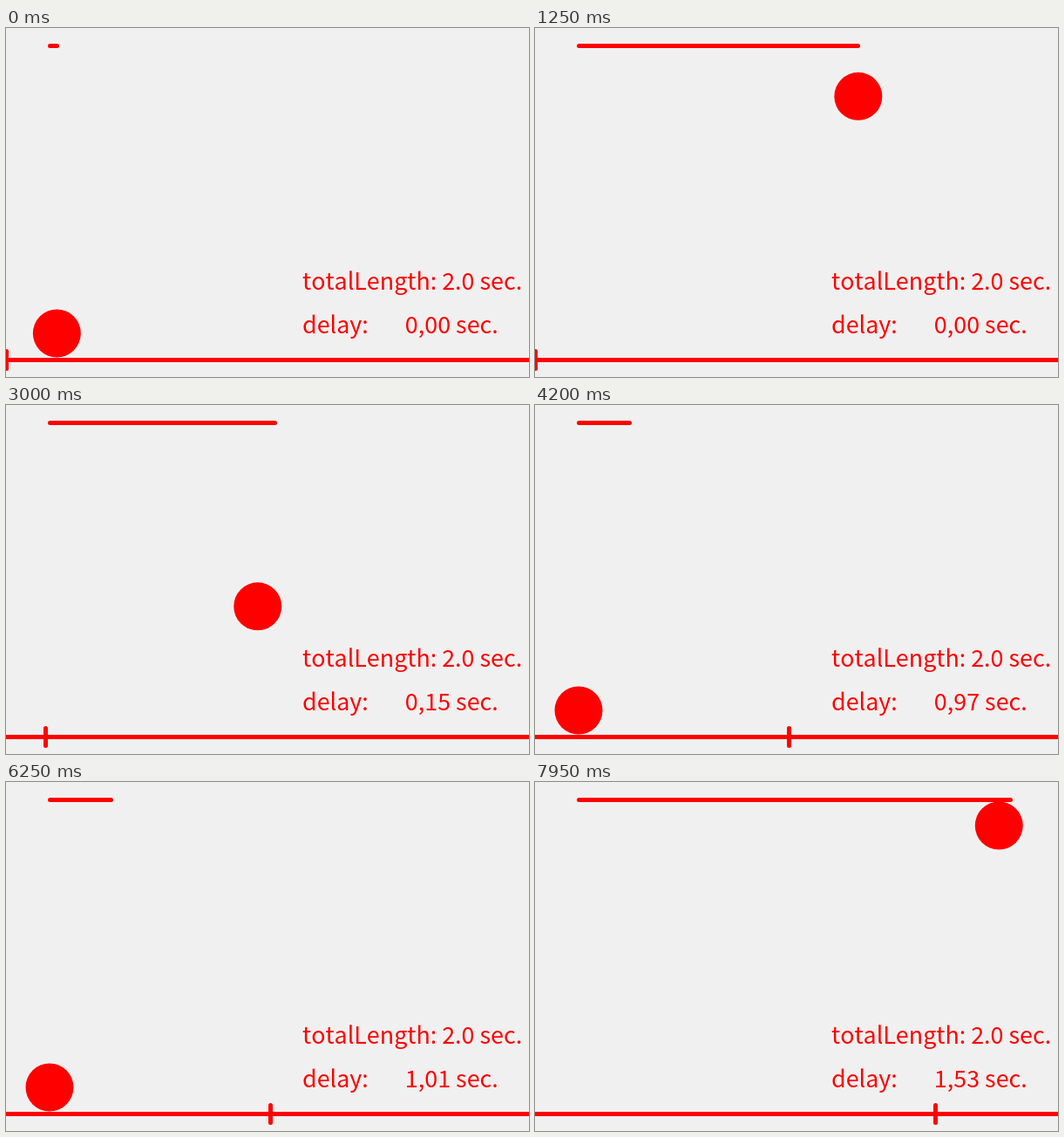
Recreate the animation shown at these times as an HTML page. Size 600 by 400 pixels, loop 8 s.

```html
<!DOCTYPE html>
<html lang="en">
<head>
<meta charset="utf-8">
<title>Delayed easing</title>
<style>
  html, body { margin: 0; width: 100%; height: 100%; overflow: hidden; background: #f0f0f0; }
  svg { display: block; width: 600px; height: 400px; }
  line { stroke: #f00; stroke-width: 5; stroke-linecap: round; }
  circle, text { fill: #f00; }
  text {
    font: 26.86px "Noto Sans CJK SC", "Noto Sans CJK JP", "Noto Sans CJK", "Open Sans", sans-serif;
    font-kerning: none;
    white-space: pre;
  }
</style>
</head>
<body>
<svg viewBox="0 0 600 400">
  <line id="bar" x1="50.5" y1="20.5" x2="50.5" y2="20.5"/>
  <line x1="-10" y1="380.5" x2="610" y2="380.5"/>
  <line id="tick" y1="370.5" y2="390.5"/>
  <circle id="ball" r="27.5"/>
  <text x="340" y="300">totalLength: 2.0 sec.</text>
  <text id="label" x="340" y="350"></text>
</svg>
<script>
  const LOOP = 8000, STEP = 50, CYCLE = 2, PHASE = 1 / 30;
  const [bar, tick, ball, label] = ['bar', 'tick', 'ball', 'label'].map(id => document.getElementById(id));

  // Dragged slider position: [ms, px]
  const drag = [
    [0, 0], [1350, 0], [1700, 12], [2550, 35], [3000, 45], [3400, 125],
    [3850, 282], [4050, 291], [4300, 291], [4600, 303], [7550, 303],
    [7650, 315], [7800, 400], [7950, 459]
  ];

  function sliderAt(ms) {
    const i = drag.findIndex(([t]) => t >= ms);
    if (i < 1) return drag[0][1];
    const [t0, x0] = drag[i - 1], [t1, x1] = drag[i];
    return Math.round(x0 + (x1 - x0) * (ms - t0) / (t1 - t0));
  }

  const quintInOut = p => p < 0.5 ? 16 * p ** 5 : 1 - 16 * (1 - p) ** 5;
  const snap = v => Math.floor(v) + 0.5;

  function draw(ms) {
    const time = (ms / 1000 + PHASE) % CYCLE;
    const slider = sliderAt(ms);
    const delay = slider / 300;
    const p = Math.max(0, (time - delay) / (CYCLE - delay));

    bar.setAttribute('x2', snap(50 + 500 * time / CYCLE));
    tick.setAttribute('x1', snap(slider));
    tick.setAttribute('x2', snap(slider));
    ball.setAttribute('cx', 50 + 500 * p);
    ball.setAttribute('cy', 350 - 300 * quintInOut(p));
    label.textContent = 'delay:' + ' '.repeat(7) + delay.toFixed(2).replace('.', ',') + ' sec.';
  }

  const start = performance.now();
  function loop() {
    const ms = (performance.now() - start) % LOOP;
    draw(Math.floor(ms / STEP) * STEP);
    requestAnimationFrame(loop);
  }
  draw(0);
  requestAnimationFrame(loop);
</script>
</body>
</html>
```
